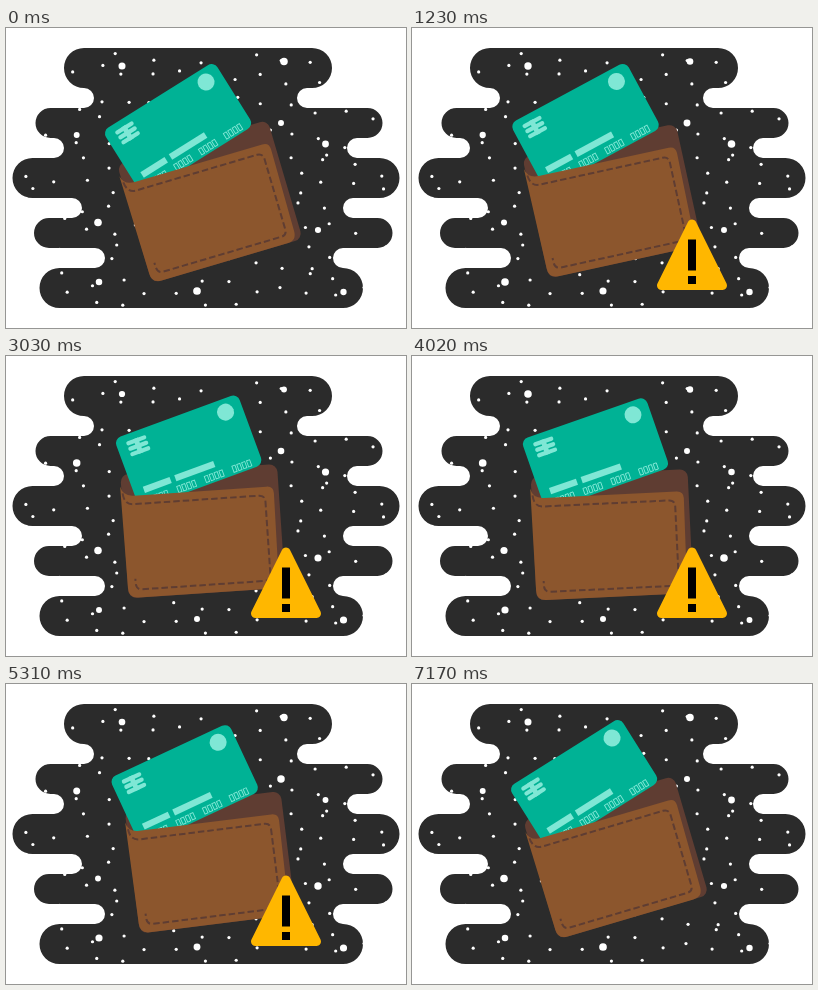
An HTML page with a canvas for the animation above (7200 ms loop, 400 by 300 pixels).

```html
<!DOCTYPE html>
<html>
<head>
<meta charset="utf-8">
<style>
html, body { margin: 0; width: 100%; height: 100%; overflow: hidden; background: #fff; }
canvas { display: block; }
</style>
</head>
<body>
<canvas id="stage" width="400" height="300"></canvas>
<script>
const ctx = document.getElementById('stage').getContext('2d');
const LOOP = 7200, TAU = Math.PI * 2, HALF = Math.PI / 2;
const DARK = '#2b2b2b', GREEN = '#00b295', MINT = '#7fe7d5';
const LEATHER = '#8c562d', LINING = '#5f3d32', AMBER = '#ffb700';

// Night sky outline from top to bottom: bulges and notches alternate
const radii = [20, 10, 15, 10, 20, 10, 15, 10, 20];
const rightCentres = [306, 301, 361.5, 351, 373.5, 347, 371.5, 337, 337];
const leftCentres = [78, 78, 44.5, 48, 26.5, 66, 43, 89, 53.5];

const bigStars = [
  [70.7, 107], [116, 38], [278, 33.5], [275, 95], [319.5, 116],
  [92, 194.5], [312, 202], [93, 254], [191, 263], [337.5, 264]
];

let seed = 7;
function random() {
  seed = seed * 16807 % 2147483647;
  return seed / 2147483647;
}

// Evenly spread points, loosened by a little chance
const smallStars = Array.from({ length: 165 }, (_, i) => [
  10 + 380 * (i * .7549 % 1) + 10 * random() - 5,
  22 + 256 * (i * .5698 % 1) + 10 * random() - 5
]);

function box(x, y, w, h, r, color) {
  ctx.beginPath();
  ctx.roundRect(x, y, w, h, r);
  ctx.fillStyle = color;
  ctx.fill();
}

function disc(x, y, r, color) {
  ctx.beginPath();
  ctx.arc(x, y, r, 0, TAU);
  ctx.fillStyle = color;
  ctx.fill();
}

function placed([x, y, angle], scale, draw) {
  ctx.save();
  ctx.translate(x, y);
  ctx.rotate(angle * Math.PI / 180);
  ctx.scale(scale, scale);
  draw();
  ctx.restore();
}

function drawSky(phase) {
  let y = 20;
  ctx.beginPath();
  radii.forEach((r, i) => {
    ctx.arc(rightCentres[i], y + r, r, -HALF, HALF, i % 2 === 1);
    y += 2 * r;
  });
  for (let i = radii.length - 1; i >= 0; i--) {
    const r = radii[i];
    ctx.arc(leftCentres[i], y - r, r, HALF, -HALF, i % 2 === 1);
    y -= 2 * r;
  }
  ctx.fillStyle = DARK;
  ctx.fill();
  for (const [x, y] of smallStars) disc(x, y, 1.6, '#fff');
  bigStars.forEach(([x, y], i) => {
    disc(x, y, 3.4 + .45 * Math.cos(phase * (1 + i % 2) + 3 + i * 2), '#fff');
  });
}

function drawBack() {
  box(-76, -69, 157, 124, 8, LINING);
}

const front = new Path2D('M-77-57Q-75-47-64-47H69Q76-47 76-40L75 45Q75 55 65 55H-66Q-76 55-76 45Z');
const stitch = new Path2D('M-75-50Q-74-38.5-65-38.5H61Q67-38.5 67-32V41Q67 47 61 47H-62Q-68 47-68 40V36');

function drawFront() {
  ctx.fillStyle = LEATHER;
  ctx.fill(front);
  ctx.strokeStyle = LINING;
  ctx.lineWidth = 2;
  ctx.setLineDash([6.5, 3]);
  ctx.stroke(stitch);
}

function drawCard() {
  box(-114, -13.3, 131.5, 75.3, 7, GREEN);
  disc(0, 0, 8.5, MINT);
  // chip
  for (let i = 0; i < 3; i++) box(-104, -6.5 + i * 5.8, 21, 4.2, 2, MINT);
  box(-96, -6.5, 5, 15.8, 0, MINT);
  box(-103.5, 41.5, 28.5, 6.5, 0, MINT);
  box(-70, 41.5, 41.5, 6.5, 0, MINT);
  // embossed zeros
  ctx.strokeStyle = MINT;
  ctx.lineWidth = .9;
  for (let i = 0; i < 16; i++) {
    ctx.strokeRect(-101 + (i >> 2) * 29.4 + i % 4 * 5.2, 53, 3.3, 6.5);
  }
}

function drawWarning() {
  ctx.beginPath();
  ctx.moveTo(0, -31);
  ctx.lineTo(30.5, 30.5);
  ctx.lineTo(-30.5, 30.5);
  ctx.closePath();
  ctx.fillStyle = ctx.strokeStyle = AMBER;
  ctx.lineWidth = 9;
  ctx.lineJoin = 'round';
  ctx.fill();
  ctx.stroke();
  box(-4, -15.5, 8, 31, 0, '#000');
  box(-4, 21, 8, 8, 0, '#000');
}

const ease = u => (1 - Math.cos(Math.PI * Math.min(1, Math.max(0, u)))) / 2;

// Pops in past full size, settles, later shrinks away
function warningScale(t) {
  return 1.3 * ease((t - 80) / 340) - .3 * ease((t - 420) / 300) - ease((t - 5600) / 580);
}

function draw(t) {
  const phase = TAU * t / LOOP;
  const sway = (mid, c, s, c2, s2) => mid + c * Math.cos(phase) + s * Math.sin(phase)
    + c2 * Math.cos(2 * phase) + s2 * Math.sin(2 * phase);
  const wallet = [
    sway(199.8, 3.6, -3, 0, .5),
    sway(182.7, -1.7, -2.6, 0, .9),
    sway(-9, -6.8, -.7, -.65, .2)
  ];
  const card = [
    sway(210.5, -10.7, -1, .2, 0),
    sway(55.9, -1.9, -2.2, 0, .5),
    sway(-25.6, -6.5, 0, 0, .4)
  ];
  ctx.fillStyle = '#fff';
  ctx.fillRect(0, 0, 400, 300);
  drawSky(phase);
  placed(wallet, 1, drawBack);
  placed(card, 1, drawCard);
  placed(wallet, 1, drawFront);
  const size = warningScale(t);
  if (size > .01) placed([280, 227, 0], size, drawWarning);
}

const start = performance.now();
function tick() {
  draw((performance.now() - start) % LOOP);
  requestAnimationFrame(tick);
}
tick();
</script>
</body>
</html>
```
